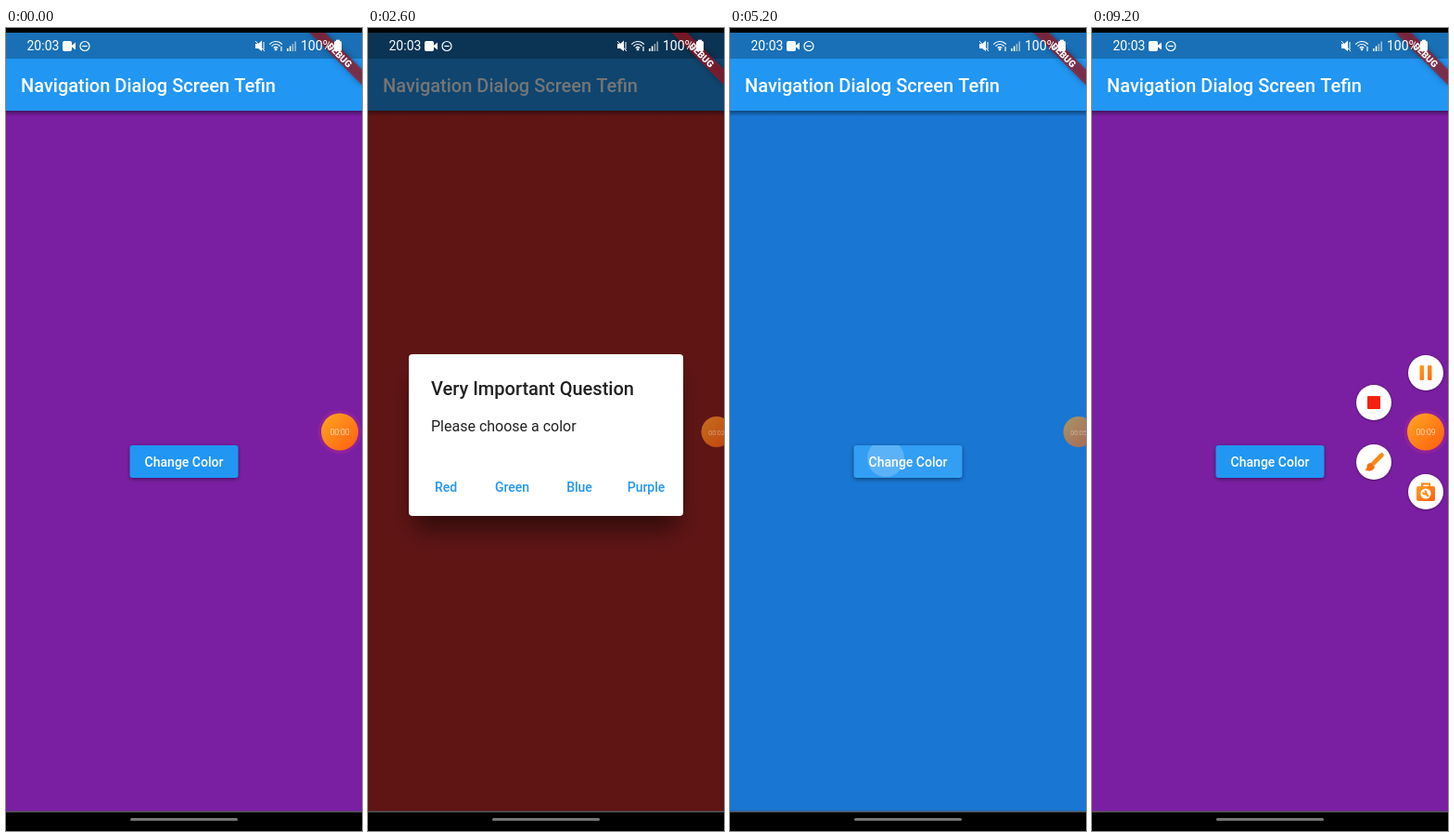
Animation of 384 by 864 pixels, one loop 9800 ms. Source, as an HTML page with a canvas:

```html
<!DOCTYPE html>
<html lang="en">
<head>
<meta charset="utf-8">
<title>Color dialog</title>
<style>
html, body { margin: 0; width: 100%; height: 100%; overflow: hidden; background: #000; }
canvas { display: block; width: 384px; height: 864px; }
</style>
</head>
<body>
<canvas id="stage" width="384" height="864"></canvas>
<script>
const ctx = document.getElementById('stage').getContext('2d');
const LOOP = 9800, STEP = 100;
const BLUE = '#2196f3', PURPLE = '#7b1fa2';
const OPTIONS = [['Red', 84], ['Green', 155.5], ['Blue', 228], ['Purple', 300]];

// tap: button press, open/close: fade spans, pick: option press
const DIALOGS = [
  { tap: 100, open: [250, 500], pick: 1300, close: [1380, 1650], color: '#d32f2f' },
  { tap: 2200, open: [2250, 2450], pick: 3000, close: [3100, 3320], color: '#388e3c' },
  { tap: 3700, open: [3720, 3900], pick: 4500, close: [4600, 4820], color: '#1976d2' },
  { tap: 5200, open: [5220, 5400], pick: 6000, close: [6000, 6190], color: PURPLE }
];

const clamp = v => Math.max(0, Math.min(1, v));
const span = (t, a, b) => clamp((t - a) / (b - a));
const easeOut = v => 1 - (1 - v) ** 3;
const mix = (a, b, v) => a + (b - a) * v;

function layer(draw, alpha = 1) {
  ctx.save();
  ctx.globalAlpha *= alpha;
  draw();
  ctx.restore();
}

function rect(x, y, w, h, fill, r = 0) {
  ctx.fillStyle = fill;
  ctx.beginPath();
  ctx.roundRect(x, y, w, h, r);
  ctx.fill();
}

function disc(x, y, r, fill) {
  ctx.fillStyle = fill;
  ctx.beginPath();
  ctx.arc(x, y, r, 0, Math.PI * 2);
  ctx.fill();
}

function poly(points, fill) {
  ctx.fillStyle = fill;
  ctx.beginPath();
  points.forEach(([x, y]) => ctx.lineTo(x, y));
  ctx.fill();
}

function line(points, color, width) {
  ctx.strokeStyle = color;
  ctx.lineWidth = width;
  ctx.beginPath();
  points.forEach(([x, y]) => ctx.lineTo(x, y));
  ctx.stroke();
}

function text(str, x, y, size, weight, color, align = 'left') {
  ctx.font = `${weight} ${size}px Roboto, sans-serif`;
  ctx.textAlign = align;
  ctx.fillStyle = color;
  ctx.fillText(str, x, y);
}

function shadow(color, blur, dy) {
  ctx.shadowColor = color;
  ctx.shadowBlur = blur;
  ctx.shadowOffsetY = dy;
}

function ripple(x, y, r, box, fill) {
  layer(() => {
    ctx.beginPath();
    ctx.roundRect(...box, 4);
    ctx.clip();
    disc(x, y, r, fill);
  });
}

function drawButton(press) {
  const box = [133.5, 449, 117, 35];
  layer(() => {
    shadow('rgba(0,0,0,.45)', 4, 1.5);
    rect(...box, BLUE, 3);
  });
  if (press >= 0 && press < 400) {
    const fade = 1 - press / 400;
    rect(...box, `rgba(255,255,255,${.08 * fade})`, 3);
    ripple(168, 463, 20 + press * .25, box, `rgba(255,255,255,${.2 * fade})`);
  }
  text('Change Color', 192, 471.5, 14, 500, '#fff', 'center');
}

function drawScreen(color, press) {
  rect(0, 5, 384, 838, color);
  const g = ctx.createLinearGradient(0, 89, 0, 95);
  g.addColorStop(0, 'rgba(0,0,0,.4)');
  g.addColorStop(1, 'rgba(0,0,0,0)');
  rect(0, 89, 384, 6, g);
  rect(0, 33, 384, 56, BLUE);
  rect(0, 5, 384, 28, '#1970b6');
  text('Navigation Dialog Screen Tefin', 16, 69, 20, 500, '#fff');
  drawButton(press);
}

function drawDialog(paper, picked, press) {
  layer(() => {
    shadow('rgba(0,0,0,.5)', 26, 16);
    rect(50, 358, 284, 166, paper, 4);
  });
  rect(44, 351, 296, 174, paper, 4);
  text('Very Important Question', 68, 394.5, 20, 500, '#212121');
  text('Please choose a color', 68, 433.5, 16, 400, '#212121');
  if (press >= 0) {
    const x = OPTIONS[picked][1];
    ripple(x, 494, 18 + press * .12, [x - 32, 476, 64, 36], 'rgba(33,150,243,.14)');
  }
  OPTIONS.forEach(([name, x]) => text(name, x, 498.5, 14, 500, BLUE, 'center'));
}

function drawBanner() {
  layer(() => {
    ctx.beginPath();
    ctx.rect(0, 5, 384, 838);
    ctx.clip();
    ctx.translate(384, 5);
    ctx.rotate(Math.PI / 4);
    layer(() => {
      shadow('rgba(0,0,0,.5)', 6, 0);
      rect(-40, 28, 80, 12, 'rgba(165,20,28,.68)');
    });
    text('DEBUG', 0, 37.8, 10.2, 900, '#fff', 'center');
  });
}

function drawStatus() {
  const w = '#fff';
  text('20:03', 22.5, 24, 14, 400, w);
  rect(61, 14, 10, 11, w, 2);
  poly([[70, 19.5], [75, 15.5], [75, 23.5]], w);
  ctx.strokeStyle = w;
  ctx.lineWidth = 1.2;
  ctx.beginPath();
  ctx.arc(85, 19.5, 5, 0, Math.PI * 2);
  ctx.stroke();
  line([[82.3, 19.5], [87.7, 19.5]], w, 1.3);
  // muted speaker
  poly([[269, 17], [272, 17], [276, 13.5], [276, 25], [272, 22], [269, 22]], w);
  line([[269, 14], [279, 25]], w, 1);
  line([[278, 15], [278, 23]], w, 1);
  // wifi
  for (const r of [3, 6, 9]) {
    ctx.lineWidth = 1.2;
    ctx.beginPath();
    ctx.arc(291, 23.5, r, -Math.PI * .77, -Math.PI * .23);
    ctx.stroke();
  }
  disc(291, 23, 1.4, w);
  line([[297, 20], [297, 25]], w, 1.2);
  for (let i = 0; i < 4; i++) {
    layer(() => rect(303 + i * 2.8, 22 - i * 2.5, 1.6, 3 + i * 2.5, w), i < 2 ? 1 : .55);
  }
  text('100%', 318, 24, 14, 400, w);
  rect(354, 14, 8, 11, w, 1.5);
  rect(356, 12.7, 4, 2, w);
}

function orange(x, y, r) {
  const g = ctx.createLinearGradient(x - r, y - r, x + r, y + r);
  g.addColorStop(0, '#ffa020');
  g.addColorStop(1, '#ff6410');
  return g;
}

const ICONS = {
  pause() {
    rect(-6.5, -8, 4.5, 16, orange(0, 0, 9), 1);
    rect(2, -8, 4.5, 16, orange(0, 0, 9), 1);
  },
  stop() { rect(-7, -7, 14, 14, '#f5200d', 1); },
  brush() {
    ctx.lineCap = 'round';
    line([[8.5, -7.5], [-.5, 1.5]], '#f98a14', 4.6);
    ctx.fillStyle = '#f5700d';
    ctx.beginPath();
    ctx.moveTo(-3, 1);
    ctx.quadraticCurveTo(-8, 1, -7.5, 6);
    ctx.quadraticCurveTo(-8, 8, -10, 8.5);
    ctx.quadraticCurveTo(-1, 12, 1, 5);
    ctx.fill();
  },
  toolbox() {
    ctx.strokeStyle = '#f98a14';
    ctx.lineWidth = 2.2;
    ctx.strokeRect(-4, -8.5, 8, 5);
    rect(-10, -6, 20, 16, orange(0, 0, 9), 2);
    disc(0, 2, 5.6, '#fff');
    disc(-1, 1, 2.6, '#f98a14');
    line([[-1, 1], [3, 5]], '#f98a14', 2);
    line([[-3, -1], [-1, 1]], '#fff', 1.4);
  }
};
const MENU = [['pause', 360, 371], ['stop', 304, 403], ['brush', 304, 467], ['toolbox', 360, 499]];

function drawMenu(t) {
  const v = easeOut(span(t, 8200, 8500));
  if (!v) return;
  for (const [name, x, y] of MENU) {
    layer(() => {
      ctx.translate(mix(360, x, v), mix(434.5, y, v));
      ctx.scale(mix(.4, 1, v), mix(.4, 1, v));
      layer(() => {
        shadow('rgba(0,0,0,.5)', 3, .5);
        disc(0, 0, 19, '#fff');
      });
      ICONS[name]();
    }, v);
  }
}

function drawOrb(t) {
  const shrink = span(t, 1300, 1750), tuck = span(t, 6000, 6200), back = span(t, 8100, 8300);
  const x = mix(mix(mix(360, 376, shrink), 386, tuck), 360, back);
  const r = mix(mix(20, 16.5, shrink), 20, Math.max(tuck, back));
  const alpha = mix(mix(1, .62, shrink), 1, back);
  const glow = Math.max(1 - shrink, back);
  layer(() => disc(x, 434.5, r + 3.5, '#d0308a'), .22 * glow);
  layer(() => {
    disc(x, 434.5, r, orange(x, 434.5, r * .8));
    if (tuck === 1 && back < .5) {
      disc(376.5, 434.8, 4, '#b8001e');
      return;
    }
    const sec = Math.floor(t / 1020);
    text(`00:0${sec}`, x, 437.6, 8.7 * r / 20, 300, '#fff', 'center');
  }, alpha);
}

function draw(t) {
  rect(0, 0, 384, 864, '#000');
  const done = DIALOGS.filter(d => t >= d.close[0] + (d.close[0] === d.pick ? 1 : 0));
  const color = done.length ? done[done.length - 1].color : PURPLE;
  const now = DIALOGS.findIndex(d => t >= d.tap && t < d.close[1]);
  const d = DIALOGS[now];
  drawScreen(color, d ? t - d.tap : -1);

  if (d) {
    const closing = span(t, ...d.close);
    const shown = easeOut(span(t, ...d.open)) * (1 - closing);
    if (shown > 0) {
      rect(0, 5, 384, 838, `rgba(0,0,0,${.54 * shown})`);
      const late = closing > .7;
      layer(() => drawDialog(late ? '#c8a0c8' : '#fff', now, t - d.pick), shown ** .42);
      if (late) layer(() => drawButton(-1), .85);
    }
  }

  rect(0, 842.5, 384, 1.5, '#55555a');
  rect(0, 844, 384, 20, '#000');
  rect(134, 850, 116, 3, '#757575', 1.5);
  drawBanner();
  drawStatus();
  drawMenu(t);
  drawOrb(t);
}

const start = performance.now();
function tick() {
  const t = (performance.now() - start) % LOOP;
  draw(Math.floor(t / STEP) * STEP);
  requestAnimationFrame(tick);
}
tick();
</script>
</body>
</html>
```
